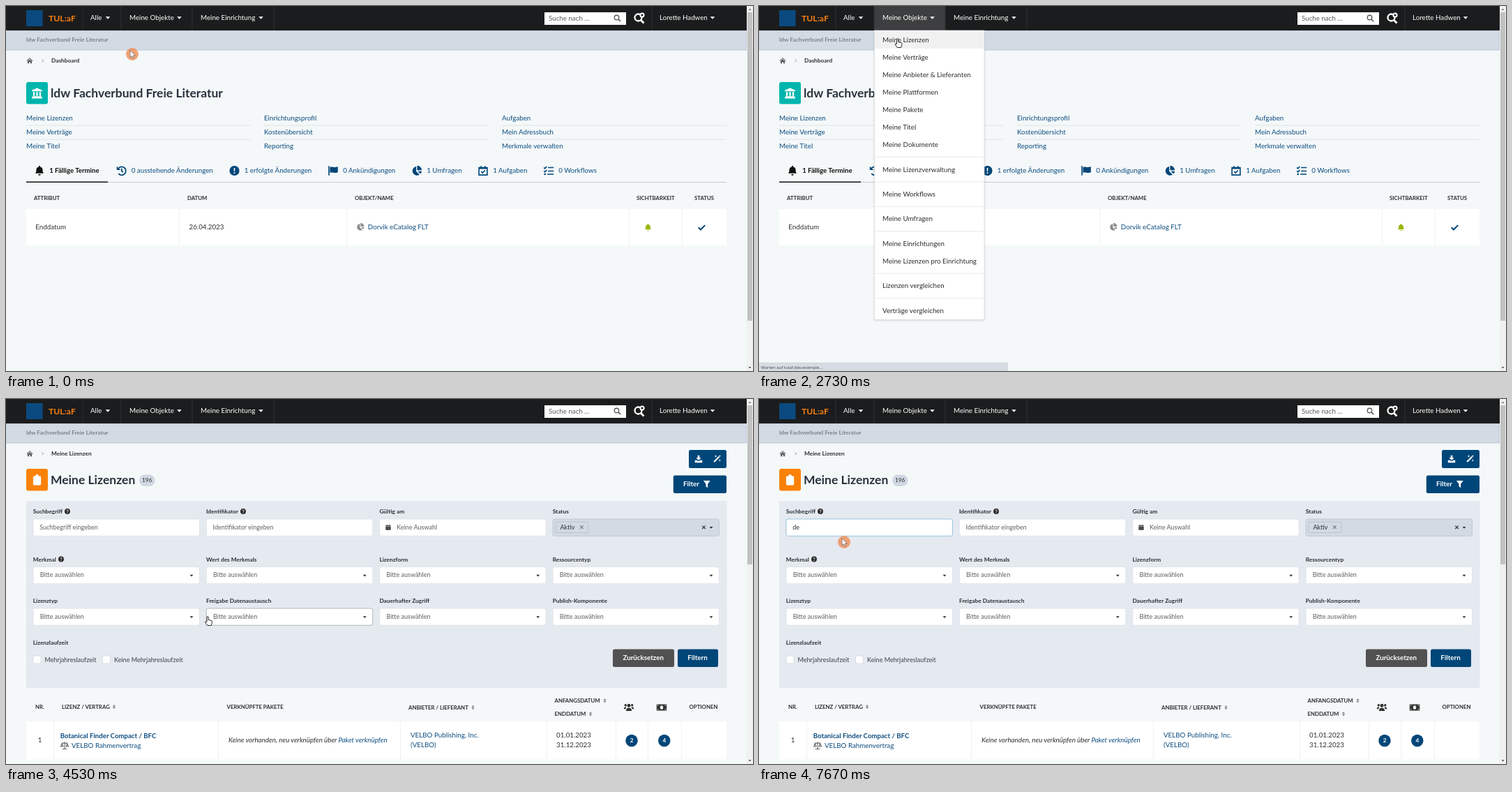
An HTML page that plays this animation: 1071x523 px, repeating every 8000 ms.

```html
<!DOCTYPE html>
<html lang="de">
<head>
<meta charset="utf-8">
<title>Meine Lizenzen</title>
<style>
html, body { margin: 0; width: 100%; height: 100%; overflow: hidden; background: #f4f8f9; }
svg { display: block; width: 1071px; height: 523px; font-family: Lato, sans-serif; }
text { white-space: pre; }
.ui { font-family: "Open Sans", sans-serif; }
#menu { filter: drop-shadow(0 1.5px 1.5px rgba(34, 36, 38, .15)); }
</style>
</head>
<body>
<svg id="stage" viewBox="0 0 1071 523"></svg>
<script>
const BLUE = '#004678', DARK = '#1b1c1d', INK = '#2b2f33', GREY = '#5c6065';
const BASE = 9.78, FIELD = 9.06, LABEL = 8.33, HEAD = 7.8;

// All icons live in a 16 x 16 box.
const icons = {
  bell: '<path d="M8 0a1 1 0 0 1 1 1v.8a5 5 0 0 1 4 5c0 2.800.7 4 1.900 5.200H1.100C2.300 10.800 3 9.600 3 6.800a5 5 0 0 1 4-5V1a1 1 0 0 1 1-1zM6 13.600h4a2 2 0 0 1-4 0z"/>',
  history: '<path d="M3 4.500A6.600 6.600 0 1 1 3.300 12.600M8.300 4.500v4l2.600 1.800" fill="none" stroke="currentColor" stroke-width="1.900"/><path d="M.6 1v6h6z"/>',
  alert: '<circle cx="8" cy="8" r="7.800"/><path d="M7 3.500h2l-.3 5.500H7.300zM7 10.400h2v2H7z" fill="#fff"/>',
  flag: '<path d="M.5.500h1.800v15H.5zM3 2.500c3-2 5.500 1.500 12.500-.8v8.800c-6 2.500-8.500-1.200-12.500.8z"/>',
  pie: '<path d="M7 1.500V9l5.300 5A7 7 0 1 1 7 1.500z"/><path d="M8.500 0a7.300 7.300 0 0 1 7.300 7.300H8.500z"/><path d="M9.500 8.700h6.300a7 7 0 0 1-2 4.300z"/>',
  calendar: '<path d="M1.500 3h13v11.800h-13zM1.500 4.300h13M4.800.5v3M11.200.5v3M5 9.300l2.200 2.200 4-4" fill="none" stroke="currentColor" stroke-width="1.800"/>',
  tasks: '<path d="M.5 3l1.500 1.500L5 1.500M.5 8.500L2 10l3-3M7 3h9M7 8.500h9M6 13.500h10" fill="none" stroke="currentColor" stroke-width="1.800"/><circle cx="2.200" cy="13.500" r="1.500"/>',
  check: '<path d="M1.500 8.500l4.300 4.300L14.500 4" fill="none" stroke="currentColor" stroke-width="2.900"/>',
  home: '<path d="M8 1l8 7-1 1.200L8 3.200 1 9.200 0 8zM2.500 9.300L8 4.600l5.500 4.700V15h-4v-4h-3v4h-4z"/>',
  temple: '<path d="M8 0l8 3.500V5H0V3.500zM2 6h2.500v6H2zM6.800 6h2.400v6H6.800zM11.500 6H14v6h-2.500zM1 12.500h14V14h1v2H0v-2h1z"/>',
  search: '<circle cx="6.500" cy="6.500" r="5" fill="none" stroke="currentColor" stroke-width="2"/><path d="M10 10l5 5" stroke="currentColor" stroke-width="2.300"/>',
  finder: '<circle cx="6.500" cy="7.500" r="5" fill="none" stroke="currentColor" stroke-width="2.300"/><path d="M10 11l4.500 4.500" stroke="currentColor" stroke-width="2.800"/><circle cx="12" cy="4" r="2.600" fill="#1b1c1d" stroke="currentColor" stroke-width="2"/>',
  clipboard: '<path d="M2 3.500Q2 2 3.500 2H5.500a2.500 2.500 0 0 1 5 0h2Q14 2 14 3.500v11q0 1.500-1.500 1.500h-9Q2 16 2 14.500z"/>',
  help: '<circle cx="8" cy="8" r="7.800"/><path d="M5.500 6.300C5.500 3 10.500 3 10.500 6.200 10.500 8 8 8 8 10" fill="none" stroke="#fff" stroke-width="1.800"/><circle cx="8" cy="12.300" r="1.200" fill="#fff"/>',
  date: '<path d="M1 5.500h14V15H1zM1 2.500h2.800V0h2v2.500h4.400V0h2v2.500H15v2H1z"/>',
  download: '<path d="M6 0h4v5.500h3.500L8 11 2.500 5.500H6zM0 10.500h4.500L8 13.500l3.500-3H16V16H0z"/>',
  wand: '<path d="M.5 13.500L11 3l2.200 2.200L2.700 15.700z"/><path d="M13.500 0l.7 1.800 1.800.7-1.800.7-.7 1.800-.7-1.800-1.800-.7 1.800-.7zM5 0l.8 2 2 .8-2 .8-.8 2-.8-2-2-.8 2-.8zM13.500 9l.7 1.800 1.800.7-1.800.7-.7 1.800-.7-1.800-1.800-.7 1.800-.7z"/>',
  funnel: '<path d="M.5.500h15L10 7.500V16l-4-3V7.500z"/>',
  sort: '<path d="M3.500 7L8 1.500 12.500 7zM3.500 9h9L8 14.500z"/>',
  users: '<circle cx="8" cy="5" r="2.700"/><circle cx="2.800" cy="4.500" r="1.900"/><circle cx="13.200" cy="4.500" r="1.900"/><path d="M3.500 13.500q0-5 4.500-5t4.500 5zM0 10.500Q0 7 3.500 7.300L4 8q-1 1-1.300 2.500zM16 10.500q0-3.500-3.500-3.200L12 8q1 1 1.300 2.500z"/>',
  money: '<path d="M0 3h16v10H0z"/><ellipse cx="8" cy="8" rx="2.400" ry="3" fill="#f4f8f9"/><path d="M1.200 4.200h2l-2 2zM14.800 4.200h-2l2 2zM1.200 11.800h2l-2-2zM14.800 11.800h-2l2-2z" fill="#f4f8f9"/>',
  scale: '<path d="M8 1v13.500M3.500 14.700h9M2.500 3.500h11M3 4L.7 10h4.600L3 4M13 4l-2.300 6h4.600L13 4" fill="none" stroke="currentColor" stroke-width="1.400"/>'
};

const text = (x, y, s, { size = BASE, w = 400, fill = INK, extra = '' } = {}) =>
  `<text x="${x}" y="${y + size * .355}" font-size="${size}" font-weight="${w}" fill="${fill}" ${extra}>${s}</text>`;
const rect = (x, y, w, h, fill, extra = '') =>
  `<rect x="${x}" y="${y}" width="${w}" height="${h}" fill="${fill}" ${extra}/>`;
const icon = (name, x, y, size, color = BLUE) =>
  `<g transform="translate(${x - size / 2} ${y - size / 2}) scale(${size / 16})" fill="${color}" color="${color}">${icons[name]}</g>`;
const caret = (x, y, r, color) =>
  `<path d="M${x - r} ${y - r / 2}h${2 * r}l${-r} ${r * 1.1}z" fill="${color}"/>`;
const cross = (x, y, r, color) =>
  `<path d="M${x - r} ${y - r}l${2 * r} ${2 * r}m0 ${-2 * r}l${-2 * r} ${2 * r}" stroke="${color}" stroke-width="1.200"/>`;
const group = (id, body) => `<g id="${id}">${body}</g>`;

const link = (x, y, s, o) => text(x, y, s, { fill: '#0d4d80', ...o });
const head = (x, y, s) => text(x, y, s, { size: HEAD, w: 700 });
const crumb = s => icon('home', 34, 78.300, 9, '#54585c') +
  '<path d="M51.700 76.300l2 2-2 2" fill="none" stroke="#777" stroke-width=".8"/>' + text(65, 78.500, s, { size: LABEL, w: 700 });
const title = (y, fill, ico, s) => rect(29, y - 16, 31, 31.500, fill, 'rx="3"') + icon(ico, 44.500, y, 15, '#fff') +
  text(64, y, s, { size: 17.500, w: 700, fill: '#28323c' });

const ORG = 'ldw Fachverbund Freie Literatur';

function navBar() {
  const white = { fill: '#fff' };
  let s = rect(0, 0, 1062, 35, DARK) + rect(165, 0, 102, 35, '#3d3e3f', 'id="navHover"');
  for (const x of [110, 165, 267, 384, 926]) s += rect(x - .5, 0, 1, 35, '#303132');
  s += rect(29, 6, 23.500, 23, '#0a4a80') + text(61, 17.500, 'TUL:aF', { size: 12.200, w: 700, fill: '#f98012' });
  for (const [x, label, cx] of [[121, 'Alle', 146], [177, 'Meine Objekte', 248.500], [279, 'Meine Einrichtung', 365.500], [937, 'Lorette Hadwen', 1013]])
    s += text(x, 16.800, label, white) + caret(cx, 16.800, 3.300, '#fff');
  s += rect(772, 9, 117, 18, '#fff') + text(778, 17.300, 'Suche nach ...', { fill: '#55595d' }) +
    icon('search', 876.500, 17.500, 10.500, '#55595d') + icon('finder', 908, 17, 16, '#fff');
  return s + rect(0, 35.500, 1061.500, 27.500, '#d2dae4', 'stroke="#bfc8d4"') +
    text(29, 48.500, ORG, { size: 8.350, w: 700, fill: '#7d8186' });
}

function dashboard() {
  let s = crumb('Dashboard') + title(125, '#00b5ad', 'temple', ORG);
  const cols = [
    ['Meine Lizenzen', 'Meine Verträge', 'Meine Titel'],
    ['Einrichtungsprofil', 'Kostenübersicht', 'Reporting'],
    ['Aufgaben', 'Mein Adressbuch', 'Merkmale verwalten']
  ];
  cols.forEach((col, i) => col.forEach((label, j) => {
    const x = 29 + i * 341;
    s += link(x, 160.200 + j * 20.100, label);
    if (j) s += rect(x, 150.500 + j * 20.100, 321.500, 1, '#dfe4e7');
  }));
  s += rect(29, 252, 1004, 1, '#c6cbd0') + rect(29, 251.500, 117, 1.500, '#111');
  const tabs = [['bell', 48, '1 Fällige Termine'], ['history', 165.500, '0 ausstehende Änderungen'], ['alert', 327.500, '1 erfolgte Änderungen'],
    ['flag', 469, '0 Ankündigungen'], ['pie', 589, '1 Umfragen'], ['calendar', 684, '1 Aufgaben'], ['tasks', 778, '0 Workflows']];
  tabs.forEach(([ico, x, label], i) => {
    s += icon(ico, x, 236, 14.500, i ? BLUE : '#111') +
      (i ? link(x + 14.200, 235.700, label) : text(x + 14.200, 235.700, label, { w: 700, size: 9.650, fill: '#111' }));
  });
  for (const [x, label] of [[40, 'ATTRIBUT'], [260, 'DATUM'], [500, 'OBJEKT/NAME'], [904, 'SICHTBARKEIT'], [987, 'STATUS']])
    s += head(x, 275.500, label);
  s += rect(29, 291, 1004, 52, '#fff');
  for (const x of [248, 488, 893, 969]) s += rect(x, 291, 1, 52, '#eef2f3');
  return s + text(42.300, 316.500, 'Enddatum') + text(262.500, 316.500, '26.04.2023') + icon('pie', 508, 316.500, 11, '#8a8d90') +
    link(518.800, 316.500, 'Dorvik eCatalog FLT') + icon('bell', 920.500, 317.300, 10.500, '#98b500') + icon('check', 997.500, 317, 11.500);
}

function menu() {
  const items = ['Meine Lizenzen', 'Meine Verträge', 'Meine Anbieter &amp; Lieferanten', 'Meine Plattformen', 'Meine Pakete', 'Meine Titel',
    'Meine Dokumente', '-', 'Meine Lizenzverwaltung', '-', 'Meine Workflows', '-', 'Meine Umfragen', '-', 'Meine Einrichtungen',
    'Meine Lizenzen pro Einrichtung', '-', 'Lizenzen vergleichen', '-', 'Verträge vergleichen'];
  let s = rect(165.500, 35, 157.500, 414.500, '#fff', 'stroke="#d9dadb" stroke-width=".7"') + rect(166, 35.500, 156.500, 25.300, '#f1f1f1', 'id="rowHover"');
  let y = 48.200;
  for (const label of items) {
    if (label === '-') {
      s += rect(166, y - 7.800, 157, 1, '#e9e9ea');
      y += 10.300;
    } else {
      s += text(177, y, label);
      y += 25.100;
    }
  }
  return s;
}

// Form fields: column, row, label, kind
const colX = [39, 287.300, 535.700, 784], rowY = [172, 240.500, 300];
const fields = [
  [0, 0, 'Suchbegriff', 'input'], [1, 0, 'Identifikator', 'input'], [2, 0, 'Gültig am', 'date'], [3, 0, 'Status', 'status'],
  [0, 1, 'Merkmal', 'select'], [1, 1, 'Wert des Merkmals', 'select'], [2, 1, 'Lizenzform', 'select'], [3, 1, 'Ressourcentyp', 'select'],
  [0, 2, 'Lizenztyp', 'select'], [1, 2, 'Freigabe Datenaustausch', 'select'], [2, 2, 'Dauerhafter Zugriff', 'select'], [3, 2, 'Publish-Komponente', 'select']
].map(([c, r, label, kind]) => ({ x: colX[c], y: rowY[r], label, kind }));
const helpAt = { Suchbegriff: 88, Identifikator: 340, Merkmal: 79 };

function form() {
  const soft = { size: FIELD, fill: GREY };
  let s = rect(29, 146, 1004.500, 268, '#e5e9f0', 'rx="3"');
  fields.forEach(({ x, y, label, kind }, i) => {
    const mid = y + 11.800, status = kind === 'status';
    s += text(x - .3, y - 10.800, label, { size: LABEL, w: 700 });
    if (helpAt[label]) s += icon('help', helpAt[label], y - 11, 8, '#222');
    s += rect(x, y, 238.500, 24.300, status ? '#d2dae4' : '#fff', `id="field${i}" rx="2.500" stroke="${status ? '#b9c4d1' : '#dcdfe5'}" stroke-width=".8"`);
    if (kind === 'input') s += text(x + 9.200, mid, label + ' eingeben', { ...soft, extra: `id="hint${i}"` });
    if (kind === 'date') s += icon('date', x + 12.300, mid + .2, 8.500, '#44484c') + text(x + 24.300, mid, 'Keine Auswahl', soft);
    if (kind === 'select') {
      const body = text(x + 9.700, mid - .2, 'Bitte auswählen', soft) + caret(x + 227, mid + .7, 2.500, '#333');
      s += label === 'Wert des Merkmals'
        ? group('rawField', text(x + 9.200, mid - .2, label, soft)) + group('readyField', body)
        : body;
    }
    if (status) s += cross(1000.500, mid, 2.200, '#333') + caret(1011, mid + .5, 2.500, '#333') +
      group('chip', rect(788, 176, 47, 15.500, '#d2dae4', 'rx="2" stroke="#b3becb" stroke-width=".8"') +
        text(794.500, mid - .2, 'Aktiv', { size: FIELD }) + cross(825.300, mid - .2, 2.300, '#777'));
  });
  s += text(48.200, 183.800, '', { size: FIELD, extra: 'id="typed"' }) + rect(48, 179.500, .9, 9.500, '#111', 'id="caret"');
  s += text(38.700, 349, 'Lizenzlaufzeit', { size: LABEL, w: 700 });
  for (const [x, label] of [[39, 'Mehrjahreslaufzeit'], [138.500, 'Keine Mehrjahreslaufzeit']])
    s += rect(x, 368, 11, 11, '#fff', 'rx="2" stroke="#d4d8df" stroke-width=".8"') + text(x + 16.500, 373.300, label, { size: FIELD, fill: '#3d4145' });
  return s;
}

const button = (x, y, w, h, fill, tx, label = '') =>
  rect(x, y, w, h, fill, 'rx="2.500"') + text(tx, y + h / 2 - .3, label, { size: 9.750, w: 700, fill: '#fff' });

function licences() {
  let s = crumb('Meine Lizenzen') + title(116, '#fb8208', 'clipboard', 'Meine Lizenzen') +
    rect(191, 108.500, 22.500, 16.500, '#d0d8e2', 'rx="8"') + text(202.200, 116.500, '196', { size: 8.360, extra: 'text-anchor="middle"' });
  s += button(979, 73, 54, 26, BLUE, 979) + icon('download', 993, 86, 10.500, '#fff') + icon('wand', 1019.500, 85.500, 11, '#fff') +
    button(956.800, 109.500, 76.200, 25.500, BLUE, 971, 'Filter') + icon('funnel', 1004.800, 122, 10.500, '#fff');
  s += form() + button(870, 358.500, 88, 25.500, '#515151', 884.500, 'Zurücksetzen') + button(963, 358.500, 58, 25.500, BLUE, 977.300, 'Filtern');
  for (const [x, y, label, sx] of [[42, 441.500, 'NR.'], [80, 441, 'LIZENZ / VERTRAG', 155], [316.500, 441.500, 'VERKNÜPFTE PAKETE'],
    [577, 442, 'ANBIETER / LIEFERANT', 669.500], [786.500, 432.300, 'ANFANGSDATUM', 858.500], [786.500, 451.300, 'ENDDATUM', 838], [979.500, 441.500, 'OPTIONEN']])
    s += head(x, y, label) + (sx ? icon('sort', sx, y, 7.500, '#777') : '');
  s += icon('users', 893, 442, 14.500, '#333') + icon('money', 940, 442, 14.500, '#333');
  s += rect(29, 462, 1004, 54.500, '#fff');
  for (const x of [68, 304, 565, 775, 874, 920, 968]) s += rect(x, 462, 1, 54.500, '#eef2f3');
  const italic = { extra: 'font-style="italic"' };
  s += text(45.800, 489, '1') + link(77.700, 482.500, 'Botanical Finder Compact / BFC', { w: 700, size: 9.650 }) +
    icon('scale', 84, 496.500, 12, '#666') + link(94, 496.700, 'VELBO Rahmenvertrag') +
    text(319, 489, 'Keine vorhanden, neu verknüpfen über', italic) + link(476.500, 489, 'Paket verknüpfen', italic) +
    link(580, 482, 'VELBO Publishing, Inc.') + link(580, 495.500, '(VELBO)') + text(789, 482, '01.01.2023') + text(789, 495.500, '31.12.2023');
  for (const [x, n] of [[897, 2], [943.800, 4]])
    s += `<circle cx="${x}" cy="489.500" r="8.700" fill="${BLUE}"/>` + text(x, 489.500, n, { size: 8.200, w: 700, fill: '#fff', extra: 'text-anchor="middle"' });
  return s;
}

const scrollbar = rect(1062, 0, 9, 523, '#f1f1f1') + rect(1063, 9, 7, 442, '#c1c1c1', 'id="thumb"') +
  '<path d="M1064.500 6l2-2.500 2 2.500z" fill="#777"/><path d="M1064.500 517l2 2.500 2-2.500z" fill="#555"/>';
const statusBar = rect(-1, 511.300, 357.500, 13, '#d5dce3', 'rx="2" stroke="#c3cad1" stroke-width=".6"') +
  text(3, 517.500, '', { size: 6.100, fill: '#3f4347', extra: 'id="statusText" class="ui"' });
const pointer = group('arrow', '<circle cx="3" cy="5.500" r="9" fill="#f28c52" opacity=".78"/>' +
    '<path d="M0 0v10.300l2.400-2.200 1.600 3.600 1.600-.8-1.500-3.400h3.200z" fill="#fff" stroke="#444" stroke-width=".6"/>') +
  group('hand', '<path d="M-1 8V1.200a1.100 1.100 0 0 1 2.200 0V5l4 .9q1.400.4 1.300 1.800L6 10.800 5.200 13H-.2L-3.300 8.600q-.3-1.400.9-1.300z" fill="#fff" stroke="#111" stroke-width=".9"/>') +
  group('beam', '<path d="M-2-4.500H2M0-4.500v9M-2 4.500H2" stroke="#111" stroke-width=".8"/>');

const $ = id => document.getElementById(id);
$('stage').innerHTML = rect(0, 0, 1071, 523, '#f4f8f9') + group('dashboard', dashboard()) + group('licences', licences()) +
  navBar() + group('menu', menu()) + scrollbar + group('status', statusBar) + group('pointer', pointer);

const ease = {
  both: u => u * u * (3 - 2 * u),
  in: u => u * u,
  out: u => 1 - (1 - u) * (1 - u),
  flat: u => u
};
// Pointer hot spot: time, x, y, easing on the way there
const path = [
  [70, 178, 63.500], [730, 214, 15, 'both'], [1270, 214, 15], [1600, 197.500, 45.500, 'both'], [1800, 197.500, 45.500],
  [1870, 197.200, 44.700, 'flat'], [2530, 197.200, 44.700], [2730, 198.500, 46.500, 'both'], [3530, 198.500, 46.500], [3730, 261, 92.500, 'in'],
  [4050, 303, 236, 'flat'], [4330, 309, 328, 'out'], [4400, 309, 328], [4530, 289, 311.500, 'in'], [5000, 95, 178.500, 'out'],
  [5600, 95, 178.500], [6100, 119, 199.500, 'both']
];

function pointerAt(t) {
  const i = path.findIndex(k => k[0] > t);
  if (i < 1) return path[i ? path.length - 1 : 0].slice(1, 3);
  const [t0, x0, y0] = path[i - 1], [t1, x1, y1, e = 'flat'] = path[i];
  const u = ease[e]((t - t0) / (t1 - t0));
  return [x0 + (x1 - x0) * u, y0 + (y1 - y0) * u];
}

const show = (id, on) => $(id).style.display = on ? '' : 'none';
const clamp = v => Math.max(0, Math.min(1, v));

function draw(t) {
  const [x, y] = pointerAt(t);
  const second = t >= 3200, menuOpen = t >= 440 && !second, ready = t >= 3930, focus = t >= 5600;
  show('dashboard', !second);
  show('licences', second);
  show('navHover', menuOpen);
  show('menu', menuOpen);
  show('rowHover', y > 36);
  $('thumb').setAttribute('height', second ? 228 : 442);

  const open = ease.out(clamp((t - 440) / 200));
  $('menu').setAttribute('transform', `translate(0 ${35 * (1 - open)}) scale(1 ${open})`);
  $('menu').setAttribute('opacity', open);

  show('status', t >= 1800 && !ready);
  $('statusText').textContent = t < 2070
    ? 'https://tulaf.ldw.example/lizenzen/aktuelleLizenzenListe'
    : 'Warten auf tulaf.ldw.example...';

  show('chip', ready);
  show('readyField', ready);
  show('rawField', !ready);

  let shape = menuOpen ? 'hand' : 'arrow';
  fields.forEach((f, i) => {
    const over = second && x >= f.x && x <= f.x + 238.500 && y >= f.y && y <= f.y + 24.300;
    if (over) shape = f.kind === 'select' ? 'hand' : 'beam';
    if (f.kind === 'select') $('field' + i).setAttribute('stroke', over ? '#a3a6ab' : '#dcdfe5');
  });
  for (const id of ['arrow', 'hand', 'beam']) show(id, id === shape);
  $('pointer').setAttribute('transform', `translate(${x} ${y})`);

  const typed = t < 7000 ? '' : t < 7130 ? 'd' : 'de';
  $('typed').textContent = typed;
  show('hint0', !typed);
  $('hint0').setAttribute('fill', focus ? '#a2a5a9' : GREY);
  $('field0').setAttribute('stroke', t >= 5650 ? '#85b7d9' : '#dcdfe5');
  show('caret', focus && t < 6130 || t >= 6670 && t < 7670);
  $('caret').setAttribute('x', 48 + typed.length * 4.900);
}

let start;
function tick(now) {
  start ??= now;
  draw((now - start) % 8000);
  requestAnimationFrame(tick);
}
draw(0);
requestAnimationFrame(tick);
</script>
</body>
</html>
```
